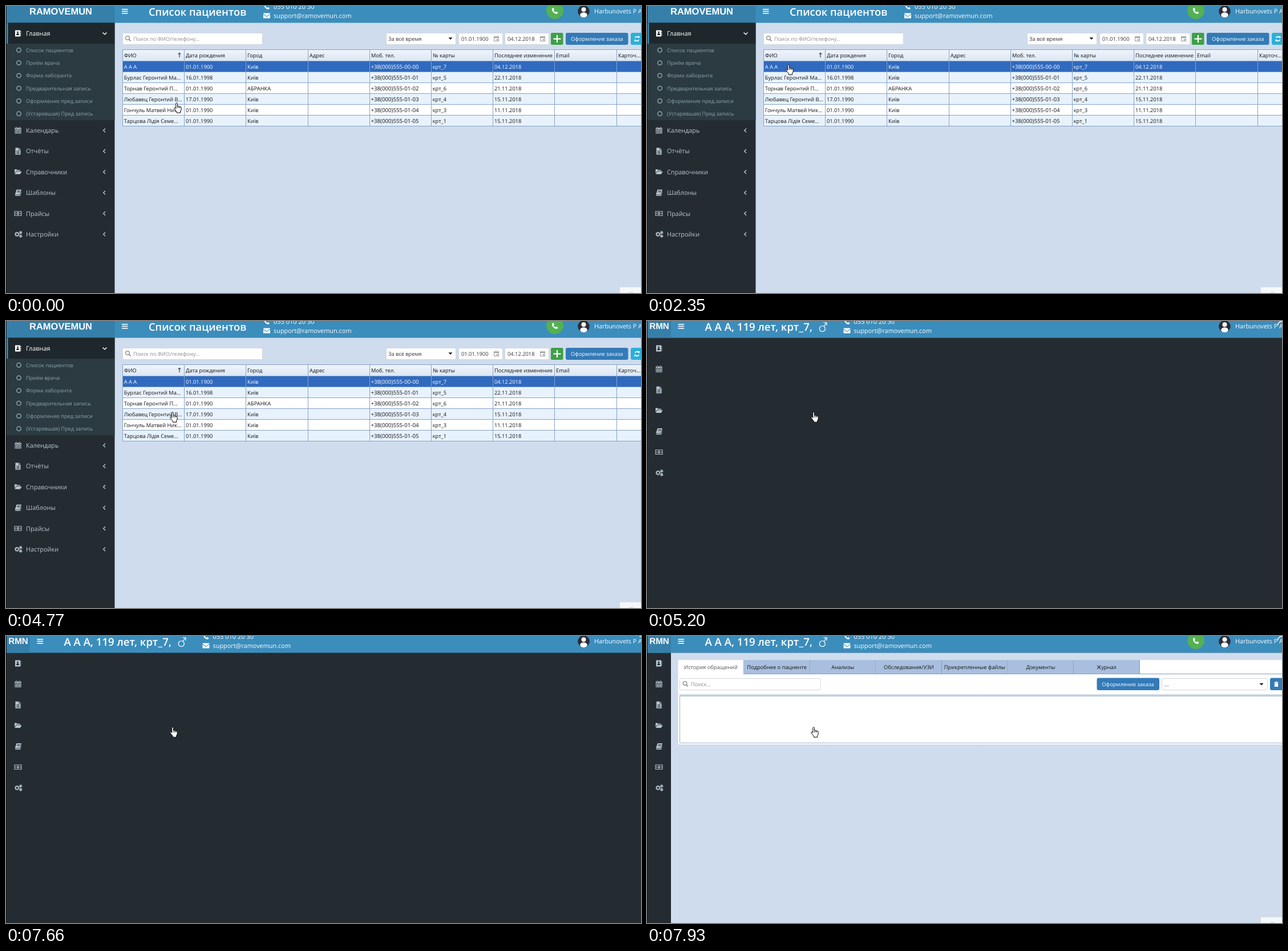
Write an HTML page with a canvas that moves like this. It is 1113 px wide and 503 px high and loops after 8000 ms.

```html
<!DOCTYPE html>
<html lang="ru">
<head>
<meta charset="utf-8">
<title>Список пациентов</title>
<style>
  html, body { margin: 0; width: 100%; height: 100%; overflow: hidden; background: #cfdced; }
  canvas { display: block; }
</style>
</head>
<body>
<canvas id="stage" width="1113" height="503"></canvas>
<script>
const ctx = document.getElementById('stage').getContext('2d');
const LOOP = 8000;
const UI = '"Open Sans", "Noto Sans", sans-serif';
const ARIAL = '"Liberation Sans", sans-serif';
const DARK = '#242c32', BLUE = '#337ab7', HEADER = '#3b8dbc', PAGE = '#cfdced', LINE = '#84a3c6', INK = '#141414';

// Icons are drawn around their own centre with the even-odd rule.
let calendarGrid = 'M-5.5-4.5H5.5V5.5H-5.5ZM-3.6-6h1.5v3h-1.5zM2.1-6h1.5v3h-1.5z';
for (let i = 0; i < 12; i++)
  calendarGrid += `M${-4.7 + (i % 4) * 2.5} ${-2 + Math.floor(i / 4) * 2.4}h1.7v1.6h-1.7z`;
const icons = {
  contacts: 'M-5-5.5H4V5.5H-5ZM-3 3H2C2 .3 1 0-.5 0S-3 .3-3 3ZM-.5-3.6a1.6 1.6 0 0 1 0 3.2a1.6 1.6 0 0 1 0-3.2M4.4-4h1v2h-1zM4.4-.8h1v2h-1zM4.4 2.2h1v2h-1z',
  calendar: calendarGrid,
  file: 'M-4.5-6H1.2V-2.2H4.5V6H-4.5ZM2-6L4.5-3H2ZM-2.7-.6h5.4v1h-5.4zM-2.7 1.5h5.4v1h-5.4zM-2.7 3.6h5.4v1h-5.4z',
  folder: 'M-6 3V-4.5H-2.5L-1.5-3.2H3.7V-1.6H-3.2ZM-2.8-.7H6.5L3.8 4H-5.6Z',
  book: 'M-2.5-5.5H6L3 3.2H-5.3ZM-1-3.6H4l-.3 1H-1.4zM-1.7-1.6H3.3l-.3 1H-2.1zM-5.4 4H3.5L6-2.5V-1L4 5.5H-4.5Z',
  money: 'M-6.5-4.2H6.5V4.2H-6.5ZM-5.4-3.2V3.2H5.4V-3.2ZM0-2.6a2.2 2.6 0 0 1 0 5.2a2.2 2.6 0 0 1 0-5.2M-.5-1.4h1v2.8h-1zM-4.7-1h1.2v2h-1.2zM3.5-1h1.2v2h-1.2z',
  phone: 'M-4.6-3.5L-2.5-5L-.8-2L-2-.8C-1.3.8 0 2 1 2.3L2.2 1L5 2.8L3.5 4.7C-.5 5.5-5.5 0-4.6-3.5Z',
  mail: 'M-6-4.5H6V-3.4L0 1L-6-3.4ZM-6-2.2L0 2.3L6-2.2V4.5H-6Z',
  trash: 'M-4.2-4H-1.5V-5.2H1.5V-4H4.2V-2.8H-4.2ZM-3.5-2.2H3.5V5H-3.5Z',
  date: 'M-4.5-4H4.5V4.5H-4.5ZM-3.5-1.5V3.5H3.5V-1.5ZM-3-5.2h1.3v2h-1.3zM1.7-5.2H3v2H1.7zM.3.5h2.4v2.3H.3z'
};
const paths = Object.fromEntries(Object.entries(icons).map(([k, d]) => [k, new Path2D(d)]));
const handPath = new Path2D('M3.7 2.4C3.7.2 6.4.2 6.4 2.4V6.5C7.2 5.9 8.4 6.2 8.7 7.1C9.5 6.6 10.6 6.9 10.8 7.8C11.8 7.4 13.2 7.9 13.2 9.1V13L11.6 16V18.3H5.3V16.5C4 14.8 2 12.5.8 10.6C.3 9.3 1.6 8.5 2.6 9.4L3.7 10.6Z');
const arrowPath = new Path2D('M.5.5V14L3.6 11L5.8 16.2L7.9 15.2L5.7 10.2H10Z');

function box(x, y, w, h, fill, radius = 0, stroke) {
  ctx.beginPath();
  ctx.roundRect(x, y, w, h, radius);
  ctx.fillStyle = fill;
  ctx.fill();
  if (stroke) { ctx.strokeStyle = stroke; ctx.lineWidth = 1; ctx.stroke(); }
}
function field(x, y, w) {
  box(x + .5, y + .5, w - 1, 20, '#fff', 2, '#d2d6dc');
}
function text(s, x, y, size, color, { align = 'left', weight = 400, family = UI } = {}) {
  ctx.font = `${weight} ${size}px ${family}`;
  ctx.textAlign = align;
  ctx.fillStyle = color;
  ctx.fillText(s, x, y);
}
function line(points, color, width = 1) {
  ctx.beginPath();
  points.forEach(([x, y]) => ctx.lineTo(x, y));
  ctx.strokeStyle = color;
  ctx.lineWidth = width;
  ctx.stroke();
}
function circle(x, y, r, fill, stroke, width = 1) {
  ctx.beginPath();
  ctx.arc(x, y, r, 0, 2 * Math.PI);
  if (fill) { ctx.fillStyle = fill; ctx.fill(); }
  if (stroke) { ctx.strokeStyle = stroke; ctx.lineWidth = width; ctx.stroke(); }
}
function icon(name, x, y, color, scale = 1) {
  ctx.save();
  ctx.translate(x, y);
  ctx.scale(scale, scale);
  ctx.fillStyle = color;
  ctx.fill(paths[name], 'evenodd');
  ctx.restore();
}
function gear(x, y, r, color) {
  circle(x, y, r, null, color, 1.5);
  ctx.setLineDash([1.3, 1.3]);
  circle(x, y, r + 1.1, null, color, 1.2);
  ctx.setLineDash([]);
}
function caret(x, y) {
  ctx.beginPath();
  ctx.moveTo(x - 3.5, y - 1.7); ctx.lineTo(x + 3.5, y - 1.7); ctx.lineTo(x, y + 2);
  ctx.fillStyle = INK;
  ctx.fill();
}
function magnifier(x, y) {
  circle(x - 1, y - 1, 3.3, null, '#888', 1.3);
  line([[x + 1.5, y + 1.5], [x + 4.5, y + 4.5]], '#888', 1.7);
}

const sections = [
  ['contacts', 'Главная'], ['calendar', 'Календарь'], ['file', 'Отчёты'], ['folder', 'Справочники'],
  ['book', 'Шаблоны'], ['money', 'Прайсы'], ['gears', 'Настройки']
];
const submenu = ['Список пациентов', 'Приём врача', 'Форма лаборанта', 'Предварительная запись',
  'Оформление пред.записи', '(Устаревшая) Пред запись'];
const columns = ['ФИО', 'Дата рождения', 'Город', 'Адрес', 'Моб. тел.', '№ карты',
  'Последнее изменение', 'Email', 'Карточ...'];
const patients = [
  ['А А А', '01.01.1900', 'Київ', '', '+38(000)555-00-00', 'крт_7', '04.12.2018'],
  ['Бурлас Геронтий Ма...', '16.01.1998', 'Київ', '', '+38(000)555-01-01', 'крт_5', '22.11.2018'],
  ['Торнав Геронтий П...', '01.01.1990', 'АБРАНКА', '', '+38(000)555-01-02', 'крт_6', '21.11.2018'],
  ['Любавец Геронтий В...', '17.01.1990', 'Київ', '', '+38(000)555-01-03', 'крт_4', '15.11.2018'],
  ['Гончуль Матвей Ник...', '01.01.1990', 'Київ', '', '+38(000)555-01-04', 'крт_3', '11.11.2018'],
  ['Тарцова Лідія Семе...', '01.01.1990', 'Київ', '', '+38(000)555-01-05', 'крт_1', '15.11.2018']
];
const menuItems = ['Оформление заказа', 'Редактировать информацию', 'Открыть карточку пациента',
  'Печать', 'Объединить карточки', 'Удалить пациента'];
const tabs = ['История обращений', 'Подробнее о пациенте', 'Анализы', 'Обследования/УЗИ',
  'Прикрепленные файлы', 'Документы', 'Журнал'];

function sectionIcon(name, y, color) {
  if (name === 'gears') {
    gear(19.3, y, 2.6, color);
    gear(25.7, y - 3, 1.2, color);
    gear(25.7, y + 3.2, 1.2, color);
  } else icon(name, 21, y, color);
}

function header(sideWidth, title, titleSize, contactX, callButton) {
  box(0, 0, 1113, 29.5, HEADER);
  box(0, 0, sideWidth, 29.5, '#367fa9');
  for (const y of [5, 8.5, 12]) box(sideWidth + 12.5, y, 10.5, 1.6, '#fff');
  text(title, sideWidth + 59.5, 17.2, titleSize, '#fff', { weight: 600 });
  icon('phone', contactX, 1, '#fff');
  icon('mail', contactX, 17, '#fff');
  text('055 010 20 30', contactX + 12, 5, 11, '#fff');
  text('support@ramovemun.com', contactX + 12, 21.3, 10.9, '#fff');
  if (callButton) {
    circle(962, 8, 15, '#53b153');
    icon('phone', 962, 8.5, '#fff', 1.1);
  }
  circle(1012.5, 9.5, 10.3, '#2c2c36');
  circle(1012.5, 6.3, 4, '#fff');
  ctx.beginPath();
  ctx.ellipse(1012.5, 15.6, 6.3, 4.3, 0, 0, 2 * Math.PI);
  ctx.fill();
  text('Harbunovets P A', 1031, 13.3, 10.8, '#fff');
}

function corner() {
  box(1076, 493, 40, 12, '#f6f7f9');
  circle(1096, 509, 8, '#dcdfe3');
}

function sidebar() {
  box(0, 29.5, 190.5, 474, DARK);
  text('RAMOVEMUN', 96, 14.5, 16.5, '#fff', { align: 'center', weight: 700, family: ARIAL });
  box(1, 29.5, 189.5, 36.5, '#1e282c');
  box(1, 29.5, 2.5, 36.5, HEADER);
  box(1, 66, 189.5, 134, '#2c3b41');
  submenu.forEach((label, i) => {
    const y = 77.3 + i * 22.3;
    circle(22.5, y, 3.7, null, '#8aa4af', 1.5);
    text(label, 35, y + 3.5, 9.2, '#8aa4af');
  });
  sections.forEach(([name, label], i) => {
    const y = i ? 218 + (i - 1) * 36.4 : 48, color = i ? '#b8c7ce' : '#fff';
    sectionIcon(name, y, color);
    text(label, 35, y + 4, 10.9, color);
    line(i ? [[174, y - 3.3], [170.7, y], [174, y + 3.3]] : [[169.5, y - 1.6], [173, y + 1.7], [176.5, y - 1.6]], color, 1.4);
  });
}

function toolbar() {
  field(204, 47, 246);
  magnifier(214, 57);
  text('Поиск по ФИО/телефону...', 223, 61, 9.1, '#8a8a8a');
  field(666, 47, 123);
  text('За всё время', 670, 61, 9.3, '#333');
  caret(779, 57);
  for (const [x, date] of [[793, '01.01.1900'], [874, '04.12.2018']]) {
    field(x, 47, 78);
    text(date, x + 5, 61, 9.3, '#333');
    icon('date', x + 66.5, 57.5, '#999');
  }
  box(955, 47, 21.5, 21, '#3fa046', 2);
  box(959.5, 56.5, 13, 2.2, '#fff');
  box(964.9, 51, 2.2, 13, '#fff');
  box(981, 47, 109.5, 21, BLUE, 3);
  text('Оформление заказа', 1035.7, 61, 9.3, '#fff', { align: 'center' });
  box(1095, 47, 26, 21, '#2bb0da', 3);
  for (const start of [0.15, 1.15]) {
    ctx.beginPath();
    ctx.arc(1106, 57.5, 3.8, start * Math.PI, (start + 0.7) * Math.PI);
    ctx.strokeStyle = '#fff';
    ctx.lineWidth = 1.7;
    ctx.stroke();
  }
  box(1107.5, 53, 3, 3, '#fff');
  box(1101.5, 59, 3, 3, '#fff');
}

function table() {
  const left = 204, top = 76.5, firstRow = 96.5, rowHeight = 19, step = 108.2;
  const bottom = firstRow + patients.length * rowHeight;
  const shade = ctx.createLinearGradient(0, top, 0, firstRow);
  shade.addColorStop(0, '#f0f5fb');
  shade.addColorStop(1, '#dbe6f4');
  box(left, top, 910, firstRow - top, shade);
  patients.forEach((row, r) => {
    const y = firstRow + r * rowHeight;
    box(left, y, 910, rowHeight, r === 0 ? '#306abf' : r % 2 ? '#e8f2fd' : '#fff');
    row.forEach((value, c) =>
      text(value, left + 2.7 + c * step, y + 13.3, c === 4 ? 9.7 : 9.3, r ? INK : '#fff'));
  });
  for (let y = firstRow; y <= bottom; y += rowHeight) line([[left, y], [1113, y]], LINE);
  line([[left, top], [1113, top]], LINE);
  columns.forEach((label, c) => {
    const x = Math.round(left + c * step);
    text(label, x + 3, 90, 9.3, INK);
    line([[x + .5, top], [x + .5, bottom]], LINE);
  });
  line([[304, 90], [304, 82]], INK);
  line([[301.5, 84.7], [304, 82], [306.5, 84.7]], INK);
}

function popup(x, y, w, h, border, alpha, content) {
  ctx.save();
  ctx.globalAlpha = alpha;
  ctx.save();
  ctx.shadowColor = 'rgba(0,0,0,.4)';
  ctx.shadowBlur = 3;
  ctx.shadowOffsetX = ctx.shadowOffsetY = 1.5;
  box(x, y, w, h, '#fff');
  ctx.restore();
  box(x + .5, y + .5, w - 1, h - 1, '#fff', 0, border);
  content();
  ctx.restore();
}

function tooltip(alpha) {
  popup(292, 184, 150, 17, '#767676', alpha, () =>
    text('Любавец Геронтий Валерьевич', 296.5, 196, 9.3, '#555'));
}

function contextMenu(alpha) {
  popup(247, 102, 167, 142, '#c4c8ce', alpha, () => {
    menuItems.forEach((label, i) => text(label, 257, 119 + i * 23.2, 9.3, INK));
    ctx.beginPath();
    ctx.moveTo(401.5, 181.5); ctx.lineTo(405, 184.7); ctx.lineTo(401.5, 188);
    ctx.fill();
  });
}

function listPage(t) {
  box(190, 29, 923, 474, PAGE);
  header(190.5, 'Список пациентов', 18.3, 457, true);
  sidebar();
  toolbar();
  table();
  corner();
  if (t >= 1190 && t < 1930) tooltip(t < 1330 ? .5 : 1);
  if (t >= 2780 && t < 4770) contextMenu(t < 2930 ? .5 : 1);
}

function card() {
  box(42, 29.5, 1071, 474, PAGE);
  box(54.5, 42, 1059, 148, '#fff');
  tabs.forEach((label, i) => {
    const x = 54.5 + i * 115.6;
    if (i) box(x, 42, 115.6, 24.5, '#a9bfdf');
    line([[x + 115.2, 42], [x + 115.2, 67]], '#7f9fc4');
    text(label, x + 57.5, 58, 9.3, i ? INK : '#555', { align: 'center' });
  });
  line([[170, 66.5], [1113, 66.5]], '#7f9fc4');
  field(57, 74, 247.5);
  magnifier(67.5, 84);
  text('Поиск...', 77, 88, 9.3, '#8a8a8a');
  box(788.5, 73.5, 109.5, 21.5, BLUE, 3);
  text('Оформление заказа', 843, 88, 9.3, '#fff', { align: 'center' });
  field(902, 74, 186);
  text('...', 907, 88, 9.3, '#333');
  caret(1077, 84.5);
  box(1092, 73.5, 30, 21.5, BLUE, 3);
  icon('trash', 1103, 84.5, '#fff', .9);
  line([[57, 103.5], [1113, 103.5]], '#7d9ab8');
  line([[1113, 105.5], [57.5, 105.5], [57.5, 187.5], [1113, 187.5]], '#9db4cc');
  corner();
}

function spinner(t) {
  const turn = Math.floor((t - 5200) / 136.5) * .8 * Math.PI;
  ctx.beginPath();
  ctx.arc(1112.5, 7.5, 6.8, turn + Math.PI, turn + 1.8 * Math.PI);
  ctx.strokeStyle = '#fff';
  ctx.lineWidth = 1.5;
  ctx.stroke();
}

function patientPage(t) {
  const loaded = t >= 7810;
  box(0, 0, 1113, 503, DARK);
  header(42, 'А А А, 119 лет, крт_7,', 18.6, 350.5, loaded);
  text('RMN', 21.5, 14, 15.2, '#fff', { align: 'center', weight: 700, family: ARIAL });
  circle(307.3, 13.5, 5, null, '#fff', 1.2);
  line([[310, 9.5], [314.5, 3]], '#fff', 1.2);
  line([[309.5, 3], [314.8, 2.8], [315, 8]], '#fff', 1.2);
  sections.forEach(([name], i) => sectionIcon(name, 48 + i * 36.35, '#b8c7ce'));
  if (loaded) card();
  spinner(t);
}

// Hot spot of the pointer: time, x, y. It jumps from one place to the next.
const pointer = [
  [0, 298, 169], [310, 297, 157], [460, 294, 146], [610, 292, 154], [760, 292, 165],
  [1930, 287, 153], [2070, 269, 124], [2210, 252, 99], [2350, 247, 102],
  [3500, 252, 112], [3640, 264, 127], [3780, 277, 143], [3920, 287, 154], [4060, 291, 159]
];
function cursor(t) {
  const [, x, y] = pointer.findLast(p => p[0] <= t);
  const isArrow = t >= 2780 && t < 3500;
  const shape = isArrow ? arrowPath : handPath;
  ctx.save();
  ctx.translate(isArrow ? x : x - 4, y);
  ctx.fillStyle = '#fff';
  ctx.strokeStyle = '#000';
  ctx.lineWidth = 1;
  ctx.fill(shape);
  ctx.stroke(shape);
  if (!isArrow) for (const fx of [6.4, 8.7, 10.8]) line([[fx, 7], [fx, 10]], '#000', .8);
  ctx.restore();
}

function frame() {
  const t = performance.now() % LOOP;
  ctx.textRendering = 'geometricPrecision';
  (t < 5200 ? listPage : patientPage)(t);
  box(0, 0, 1, 503, '#10161a');
  cursor(t);
  requestAnimationFrame(frame);
}
frame();
</script>
</body>
</html>
```
